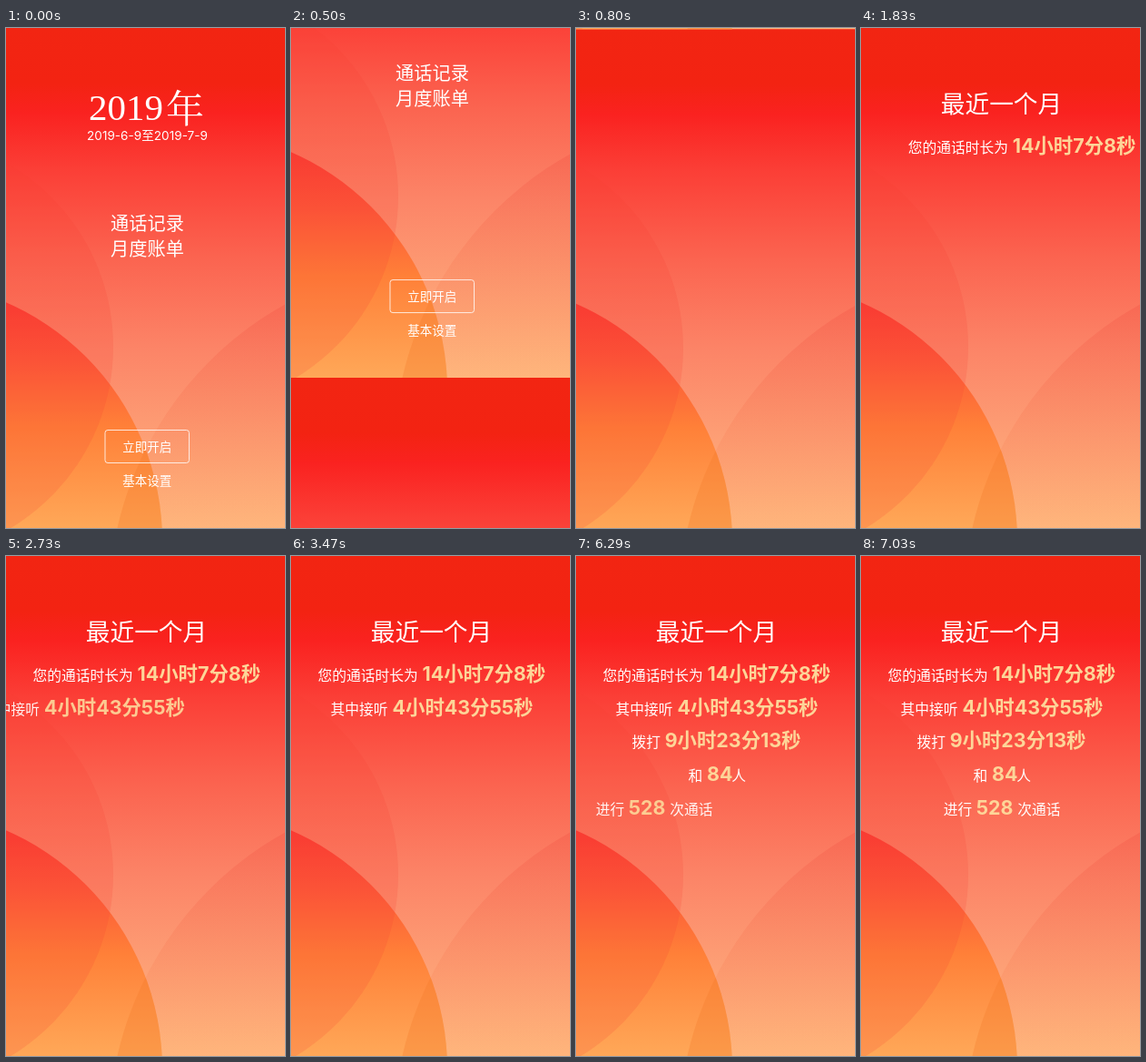
An HTML page for the animation above (8 s loop, 307 by 549 pixels).

```html
<!DOCTYPE html>
<html lang="zh">
<head>
<meta charset="utf-8">
<style>
  html, body { margin: 0; width: 100%; height: 100%; overflow: hidden; background: #f22512; }
  svg { display: block; }
  text { fill: #fff; font: 15.75px "Noto Sans CJK SC", "Noto Sans CJK", sans-serif; }
  .gold { fill: #fdd598; font: 700 21.4px Inter, "Noto Sans CJK SC", "Noto Sans CJK", sans-serif; }
  .mid { text-anchor: middle; }
  .small { font-size: 13.5px; }
  .head { font-size: 20.2px; }
  .title { font-size: 26.7px; }
  .date { font: 13.6px Inter, "Noto Sans CJK SC", "Noto Sans CJK", sans-serif; }
  .year { font: 41px "Liberation Serif", serif; }
  .nian { font: 300 42px "Noto Serif CJK SC", "Noto Sans CJK SC", "Noto Sans CJK", serif; }
</style>
</head>
<body>
<svg width="100%" height="100%" viewBox="0 0 307 549">
  <defs>
    <linearGradient id="sky" gradientUnits="userSpaceOnUse" x1="0" y1="0" x2="0" y2="549">
      <stop offset="0" stop-color="#f22512"/>
      <stop offset=".11" stop-color="#f32312"/>
      <stop offset=".17" stop-color="#fa2220"/>
      <stop offset=".28" stop-color="#fb3e36"/>
      <stop offset=".46" stop-color="#fb6450"/>
      <stop offset=".64" stop-color="#fc8467"/>
      <stop offset=".82" stop-color="#fd9f75"/>
      <stop offset="1" stop-color="#ffba81"/>
    </linearGradient>
    <linearGradient id="sun" gradientUnits="userSpaceOnUse" x1="0" y1="300" x2="0" y2="549">
      <stop offset="0" stop-color="#fa3a33"/>
      <stop offset=".25" stop-color="#fc5638"/>
      <stop offset=".55" stop-color="#ff8038"/>
      <stop offset="1" stop-color="#ffa858"/>
    </linearGradient>
    <linearGradient id="shade" gradientUnits="userSpaceOnUse" x1="0" y1="300" x2="0" y2="549">
      <stop offset="0" stop-color="#f04a40" stop-opacity=".28"/>
      <stop offset="1" stop-color="#fa8c50" stop-opacity=".1"/>
    </linearGradient>
    <clipPath id="right"><circle cx="490" cy="633" r="377"/></clipPath>
    <symbol id="bg" viewBox="0 0 307 549">
      <rect width="307" height="549" fill="url(#sky)"/>
      <circle cx="490" cy="633" r="377" fill="url(#shade)"/>
      <circle cx="-114" cy="563.5" r="286" fill="url(#sun)"/>
      <circle cx="-114" cy="350" r="232" fill="#f03c32" fill-opacity=".17"/>
      <circle cx="-114" cy="563.5" r="286" fill="#f07828" fill-opacity=".3" clip-path="url(#right)"/>
    </symbol>
  </defs>

  <g id="cover">
    <use href="#bg" width="307" height="549"/>
    <text class="year" x="91" y="101">2019</text>
    <text class="nian" x="176" y="104">年</text>
    <text class="date mid" x="155.5" y="123">2019-6-9至2019-7-9</text>
    <text class="head mid" x="155.5" y="222">通话记录</text>
    <text class="head mid" x="155.5" y="250">月度账单</text>
    <rect x="109" y="441.5" width="92.5" height="36" rx="3" fill="none" stroke="#fff" stroke-opacity=".8"/>
    <text class="small mid" x="155.3" y="464.6">立即开启</text>
    <text class="small mid" x="155.3" y="501.6">基本设置</text>
  </g>

  <g id="report">
    <use href="#bg" width="307" height="549"/>
    <text id="title" class="title mid" x="154.5" y="93">最近一个月</text>
    <text class="line" x="29.5" y="137">您的通话时长为<tspan class="gold" x="144.5">14小时7分8秒</tspan></text>
    <text class="line" x="43.5" y="173.7">其中接听<tspan class="gold" x="111.5">4小时43分55秒</tspan></text>
    <text class="line" x="61.5" y="210.4">拨打<tspan class="gold" x="97.7">9小时23分13秒</tspan></text>
    <text class="line" x="123.5" y="247.1">和<tspan class="gold" x="144">84</tspan><tspan x="171.3">人</tspan></text>
    <text class="line" x="90.7" y="283.8">进行<tspan class="gold" x="126.7">528</tspan><tspan x="172.3">次通话</tspan></text>
  </g>
</svg>
<script>
const LOOP = 8000, HEIGHT = 549, STEP = 148.4, BOUNCE = 1187, FIRST = 1123;
const BOUNCE_KEYS = [[0, -1257], [.6, 22.5], [.75, -9], [.9, 4.5], [1, 0]];
const cover = document.getElementById('cover');
const report = document.getElementById('report');
const title = document.getElementById('title');
const lines = document.querySelectorAll('.line');

const clamp = v => Math.min(1, Math.max(0, v));
const easeOut = (p, power) => 1 - (1 - clamp(p)) ** power;
const moveTo = (el, x, y) => el.setAttribute('transform', `translate(${x} ${y})`);

function bounceX(p) {
  if (p >= 1) return 0;
  const i = BOUNCE_KEYS.findIndex(([at]) => at > p);
  const [t0, x0] = BOUNCE_KEYS[i - 1], [t1, x1] = BOUNCE_KEYS[i];
  return x0 + (x1 - x0) * easeOut((p - t0) / (t1 - t0), 3);
}

// The movement is stepped at a low frame rate and rests for the first half second.
const stepped = t => t < 500 ? 0 : 500 + STEP * Math.floor((t - 490) / STEP);

function draw(now) {
  const t = stepped(now % LOOP);
  const scroll = HEIGHT * easeOut((t - 438) / 379, 2);
  moveTo(cover, 0, -scroll);
  moveTo(report, 0, HEIGHT - scroll);
  title.setAttribute('opacity', clamp((t - 850) / 600));
  lines.forEach((line, i) => {
    const p = clamp((t - FIRST - i * BOUNCE) / BOUNCE);
    moveTo(line, bounceX(p), 0);
    line.setAttribute('opacity', easeOut(p / .6, 3));
  });
  requestAnimationFrame(draw);
}
requestAnimationFrame(draw);
</script>
</body>
</html>
```
